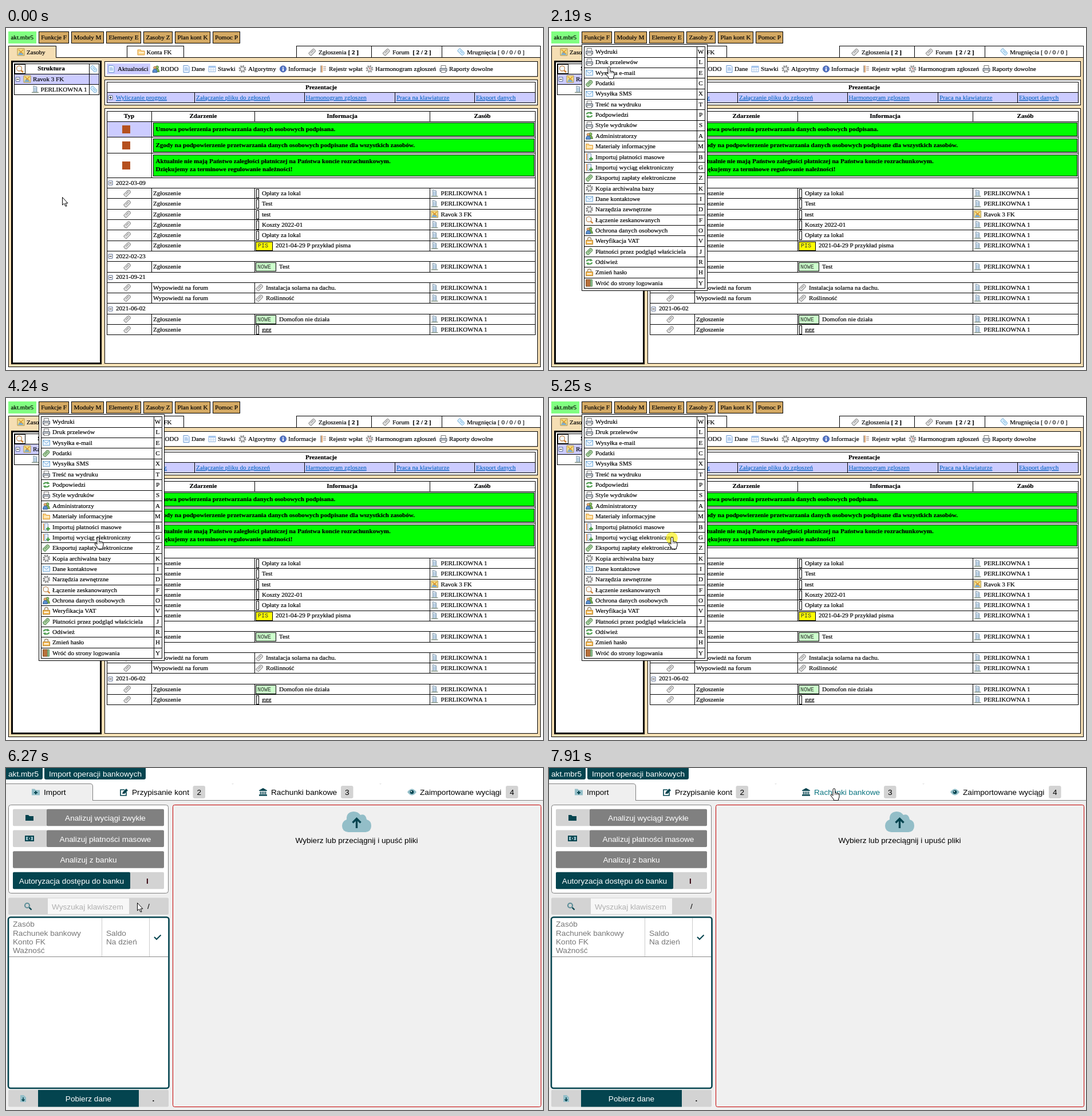
Write an HTML page that moves like this. It is 938 by 597 pixels and loops after 8000 ms.

```html
<!DOCTYPE html>
<html lang="pl">
<head>
<meta charset="utf-8">
<title>Import</title>
<style>
html, body { margin: 0; width: 100%; height: 100%; overflow: hidden; background: #fff; }
svg { display: block; width: 938px; height: 597px; }
text { white-space: pre; }
.serif { font: 11.1px "Liberation Serif", "Times New Roman", serif; stroke: currentColor; stroke-width: .2px; }
.sans { font: 13.63px "Liberation Sans", Arial, sans-serif; }
.mono { font: 10px "Liberation Mono", "Courier New", monospace; fill: #333; }
.b { font-weight: bold; }
.link { color: #0563c1; fill: #0563c1; text-decoration: underline; stroke-width: .1px; }
</style>
</head>
<body>
<svg id="stage" viewBox="0 0 938 597" xmlns="http://www.w3.org/2000/svg"></svg>
<script>
const LILAC = '#ccccff', WHEAT = '#f5deb3', TAN = '#d4a963', LIME = '#00ff00';
const TEAL = '#04444f', PALE = '#93bec8', SILVER = '#d3d3d3', GREY = '#808080', PAGE = '#efefef';
const SITE = 'akt.mbr5', FIRM = 'Ravok 3 FK', HOUSE = 'PERLIKOWNA 1';

// Drawing helpers
const fillBox = (x1, y1, x2, y2, fill, r = 0) =>
  `<rect x="${x1}" y="${y1}" width="${x2 - x1}" height="${y2 - y1}" rx="${r}" fill="${fill}"/>`;
const box = (x1, y1, x2, y2, fill = '#fff', stroke = '#000', w = 1, r = 0) =>
  `<rect x="${x1 + .5}" y="${y1 + .5}" width="${x2 - x1}" height="${y2 - y1}" rx="${r}" fill="${fill}" stroke="${stroke}" stroke-width="${w}"/>`;
const line = (x1, y1, x2, y2, stroke = '#000') =>
  `<path d="M${x1} ${y1}L${x2} ${y2}" stroke="${stroke}"/>`;
const hLine = (x1, x2, y, c) => line(x1, Math.round(y) + .5, x2 + 1, Math.round(y) + .5, c);
const vLine = (x, y1, y2, c) => line(x + .5, y1, x + .5, y2, c);
const label = (x, y, s, cls = 'serif', extra = '') =>
  `<text x="${x}" y="${y}" class="${cls}" ${extra}>${s}</text>`;
const serif = (x, cy, s, cls = '', mid = false) =>
  label(x, Math.round(cy + 3.6), s, 'serif ' + cls, mid ? 'text-anchor="middle"' : '');
const sans = (x, cy, s, fill = '#000', mid = false, extra = '') =>
  label(x, cy + 4.8, s, 'sans', `fill="${fill}" ${mid ? 'text-anchor="middle"' : ''} ${extra}`);
const path = (d, fill, stroke = 'none', w = 1) =>
  `<path d="${d}" fill="${fill}" stroke="${stroke}" stroke-width="${w}"/>`;
const dot = (x, y, r, fill, stroke = 'none', w = 1) =>
  `<circle cx="${x}" cy="${y}" r="${r}" fill="${fill}" stroke="${stroke}" stroke-width="${w}"/>`;

// Small icons, centred on 0,0
const gear = c => dot(0, 0, 5, 'none', c, 3).replace('/>', ' stroke-dasharray="2.3 1.6"/>') + dot(0, 0, 3.6, '#ececec', c, 1.2);
const slip = (fill, edge) =>
  `<g transform="rotate(-45)">${path('M-6-3H4Q6-3 6 0T4 3H-6Q-7 0-6-3Z', fill, edge)}${path('M-3-.5H3.5', 'none', edge)}</g>`;
const ICONS = {
  clip: slip('#e2e2e2', '#8b8b8b'),
  tag: `<g transform="rotate(90)">${slip('#d9efff', '#86b8dc')}</g>`,
  money: slip('#a9cf9f', '#5d8a58'),
  map: path('M-6-6H6V6H-6Z', '#f8e08a', '#a9924e') + path('M-5 5L-2-1L2 2L5 5Z', '#79aed6') + path('M-4-4L4 3M4-4L-2 2', 'none', '#d9962f', 1.5),
  house: path('M-3-6L3-4V5H-3Z', '#e3edf5', '#7f95a8') + path('M-1-3V4M1.5-3V4', 'none', '#7fa6c9') + path('M-6 5.5H6', 'none', '#8a9a8a', 1.5),
  folder: path('M-6-4H-1L0-2H6V5H-6Z', '#fbd58a', '#dd9a3c') + path('M-4 1H5', 'none', '#fff3d6', 2),
  printer: path('M-4-6H4V-1H-4Z', '#fff', '#777') + path('M-6-1H6V4H-6Z', '#c4ccd6', '#59616b') + path('M-4 2H4V6H-4Z', '#fff', '#777'),
  mail: path('M-6-4.500H6V4.500H-6Z', '#e9f4ff', '#6ea6d6') + path('M-6-4L0 1L6-4', 'none', '#6ea6d6'),
  sheet: path('M-5-6H3L5-4V6H-5Z', '#eaf3ff', '#6f9bd2') + path('M-3-2H2M-3 0H3M-3 2H3', 'none', '#86aede'),
  grid: path('M-6-5H6V5H-6Z', '#fff', '#8bb0de') + path('M-6-3.500H6', 'none', '#a8c8ef', 3) + path('M-2-2V5M2-2V5M-6 1.500H6', 'none', '#b9cfe8'),
  gear: gear('#8d8d8d'),
  clock: gear('#999') + path('M0-2V0H2', 'none', '#b33'),
  people: dot(2, -3, 2.5, '#8cc067', '#547e3c') + path('M-1 5Q-1-1 2-1T6 5Z', '#7ab04f', '#547e3c') + dot(-2, -2, 2.3, '#e7b27a', '#a46a35') + path('M-6 6Q-6 0-2 0T2 6Z', '#5a8fd0', '#365f96'),
  info: dot(0, 0, 5.5, '#5878c8', '#3d57a0') + path('M0-3.500V-2M0-1V3.500', 'none', '#fff', 2),
  list: path('M-5-6V6', 'none', '#555') + path('M-3-6V6', 'none', '#e08a3a', 1.5) + path('M-1-4H4M-1-1H4M-1 2H4', 'none', '#b9a9a0', 1.5),
  plus: path('M-5-6V6', 'none', '#e08a3a', 1.5) + path('M-3-6H3V6H-3Z', '#e6eef8', '#7f95b5') + path('M3 0V7M-.5 3.500H6.500', 'none', '#3f9a3f', 2.2),
  lock: path('M-3-1V-3Q-3-6 0-6T3-3V-1', 'none', '#a09070', 1.5) + path('M-6-1H6V6H-6Z', '#f5bd5c', '#b5812a') + path('M-4 2.500H4', 'none', '#fff', 1.8),
  turn: path('M-5-1Q-3-5 3-3M5 1Q3 5-3 3', 'none', '#4f9d4f', 2) + path('M2-6L6-2L1-1ZM-2 6L-6 2L-1 1Z', '#4f9d4f'),
  lens: path('M2 2L6 6', 'none', '#d0863a', 2.5) + dot(-1, -1, 4.5, '#f4f9ff', '#c48b55', 1.3),
  door: path('M-6-6H2V6H-6Z', '#b8713c', '#7a4a24') + path('M2-6H5V6H2Z', '#8fc08f', '#5b8a5b'),
  minus: path('M-3.500-3.500H3.500V3.500H-3.500Z', '#fff', '#52658a') + path('M-2 0H2', 'none', '#000'),
  open: path('M-3.500-3.500H3.500V3.500H-3.500Z', '#fff', '#52658a') + path('M-2 0H2M0-2V2', 'none', '#000'),
  dir: path('M-7-5H-2L0-3H7V5H-7Z', TEAL),
  dirPlus: path('M-7-5.500H-2L0-3.500H7V5.500H-7Z', PALE) + path('M0-2V4M-3 1H3', 'none', TEAL, 2),
  edit: path('M1-4H-6V6H4V0', 'none', TEAL, 1.6) + path('M-3 3L-2 0L4-6L7-3L1 3Z', TEAL),
  bank: path('M-7-3L0-7L7-3V-2H-7Z', TEAL) + path('M-4.500-1V4M-1.500-1V4M1.500-1V4M4.500-1V4', 'none', TEAL, 1.6) + path('M-7 5.500H7', 'none', TEAL, 2.4),
  eye: path('M-8 0Q0-11 8 0Q0 11-8 0Z', PALE) + dot(0, 0, 3.3, TEAL) + dot(-1, -1, 1.1, '#fff'),
  cash: path('M-8-5H8V5H-8Z', TEAL) + path('M-6-3H6V3H-6Z', PALE) + dot(0, 0, 3.2, TEAL) + path('M0-1.500V1.500', 'none', '#fff'),
  find: path('M2 2L6 6', 'none', TEAL, 2.4) + dot(-1.5, -1.5, 4, 'none', '#5f8f99', 2.2),
  file: path('M-5-6H1L5-2V6H-5Z', PALE) + path('M0-2V4M-2.500 1.500L0 4L2.500 1.500', 'none', TEAL, 1.6)
};
const icon = (name, x, y) => `<g transform="translate(${x} ${y})">${ICONS[name]}</g>`;

function topBar() {
  const items = [['Funkcje F', 57, 109], ['Moduły M', 114, 170], ['Elementy E', 175, 235],
    ['Zasoby Z', 240, 290], ['Plan kont K', 295, 356], ['Pomoc P', 361, 408]];
  return fillBox(4, 6, 53, 27, '#80ff80') + serif(28.3, 16.5, SITE, '', true) +
    items.map(([s, a, b]) => box(a, 6, b, 26, TAN) + serif((a + b) / 2 + .5, 16.5, s, '', true)).join('');
}

function tree() {
  return box(10, 58, 165, 585, '#fff', '#000', 3) + box(14, 62, 162, 116) +
    fillBox(15, 81, 162, 98, LILAC) + hLine(14, 162, 80) + hLine(14, 162, 98) +
    vLine(145, 62, 116) + box(15, 63, 33, 79) + icon('lens', 24, 71.5) +
    serif(79, 70.5, 'Struktura', 'b', true) + icon('tag', 153.5, 71.5) +
    icon('minus', 20.5, 89.5) + icon('map', 37, 89) + serif(47, 89.3, FIRM) +
    icon('house', 51, 107) + serif(60.5, 107.5, HOUSE) + icon('tag', 153.5, 107.5);
}

function toolbar() {
  const items = [['sheet', 184, 195, 'Aktualności'], ['people', 262, 270, 'RODO'], ['sheet', 315, 324, 'Dane'],
    ['grid', 360, 370, 'Stawki'], ['gear', 413, 423, 'Algorytmy'], ['info', 484, 493, 'Informacje'],
    ['list', 555, 564, 'Rejestr wpłat'], ['clock', 635, 645, 'Harmonogram zgłoszeń'], ['printer', 764, 774, 'Raporty dowolne']];
  return box(172, 58, 928, 84) + fillBox(176, 62, 252, 81, LILAC) +
    items.map(([i, x, tx, s]) => icon(i, x, 71.5) + serif(tx, 71.5, s)).join('');
}

function links() {
  const items = [['Wyliczanie prognoz', 192, 176], ['Załączanie pliku do zgłoszeń', 332, 329],
    ['Harmonogram zgloszen', 523.5, 521], ['Praca na klawiaturze', 682, 679], ['Eksport danych', 821, 818]];
  return box(172, 90, 928, 134) + box(176, 94, 924, 130) + fillBox(177, 113, 924, 130, LILAC) +
    hLine(176, 924, 112) + serif(550.5, 103, 'Prezentacje', 'b', true) + icon('open', 182.5, 121.5) +
    items.map(([s, x, v]) => vLine(v, 112, 130) + serif(x, 121, s, 'link')).join('');
}

function banner(y1, y2, lines) {
  const mid = (y1 + y2) / 2;
  return box(257, y1 + 2, 922, y2 - 3, LIME, '#000', 1) + fillBox(203, mid - 7, 217, mid + 7, '#b5501e') +
    lines.map((s, i) => serif(261.5, mid - .2 + (i - (lines.length - 1) / 2) * 14, s, 'b')).join('');
}

function news() {
  const Z = 'Zgłoszenie', W = 'Wypowiedź na forum';
  const rows = ['2022-03-09', [Z, '', 'Opłaty za lokal'], [Z, '', 'Test'], [Z, '', 'test', 1], [Z, '', 'Koszty 2022-01'],
    [Z, '', 'Opłaty za lokal'], [Z, 'PIS', '2021-04-29 P przykład pisma'], '2022-02-23', [Z, 'NOWE', 'Test'],
    '2021-09-21', [W, 'clip', 'Instalacja solarna na dachu.'], [W, 'clip', 'Roślinność'],
    '2021-06-02', [Z, 'NOWE', 'Domofon nie działa'], [Z, '', 'ggg']];
  let s = box(172, 140, 928, 585) + box(176, 145, 924, 535) + fillBox(177, 164, 254, 190, LILAC);
  [['Typ', 215], ['Zdarzenie', 344.5], ['Informacja', 587], ['Zasób', 832]].forEach(([t, x]) => s += serif(x, 153.8, t, 'b', true));
  [163, 190, 218].forEach(y => s += hLine(176, 924, y));
  s += vLine(254, 145, 261) + vLine(434, 145, 163) + vLine(740, 145, 163);
  s += banner(163, 191, ['Umowa powierzenia przetwarzania danych osobowych podpisana.']);
  s += banner(191, 219, ['Zgody na podpowierzenie przetwarzania danych osobowych podpisane dla wszystkich zasobów.']);
  s += banner(219, 261, ['Aktualnie nie mają Państwo zaległości płatniczej na Państwa koncie rozrachunkowym.',
    'Dziękujemy za terminowe regulowanie należności!']);
  rows.forEach((r, i) => {
    const y = 270 + 18.3 * i, top = Math.round(y - 9.2);
    s += hLine(176, 924, top);
    if (typeof r === 'string') {
      s += icon('minus', 182.5, Math.round(y) + .5) + serif(192, y, r);
      return;
    }
    const [kind, badge, text, firm] = r;
    [254, 434, 740].forEach(x => s += vLine(x, top, top + 19));
    s += icon('clip', 212, y) + serif(257, y, kind);
    let x = 447;
    if (badge === 'clip') { s += icon('clip', 443, y); x = 454; }
    else if (badge) {
      const pis = badge === 'PIS', end = pis ? 465 : 471;
      s += box(436, top + 2, end, top + 17, pis ? '#ffff00' : '#ccffcc') + label(pis ? 440 : 439, y + 3.6, badge, 'mono');
      x = end + 6;
    } else s += box(437, top + 2, 441, top + 17);
    s += serif(x, y, text) + icon(firm ? 'map' : 'house', 748.5, y) + serif(759.5, y, firm ? FIRM : HOUSE);
  });
  return s;
}

function desk() {
  const bold = s => `<tspan font-weight="bold">${s}</tspan>`;
  return fillBox(0, 0, 938, 597, '#fff') + topBar() + box(4, 51, 933, 591, WHEAT) +
    box(4, 31, 87, 51, WHEAT) + fillBox(5, 50, 87, 53, WHEAT) + icon('map', 26, 42) + serif(36, 42, 'Zasoby') +
    box(211, 31, 310, 51) + icon('folder', 236, 42) + serif(245.5, 42, 'Konta FK') +
    box(507, 31, 638, 51) + icon('clip', 535, 42) + serif(546, 42, 'Zgłoszenia ' + bold('[ 2 ]')) +
    box(638, 31, 761, 51) + icon('clip', 664.5, 42) + serif(675, 42, 'Forum  ' + bold('[ 2 / 2 ]')) +
    box(761, 31, 933, 51) + icon('tag', 795, 42) + serif(805, 42, 'Mrugnięcia [ 0 / 0 / 0 ]') +
    tree() + toolbar() + links() + news();
}

function menu() {
  const items = ['printer|Wydruki|W', 'printer|Druk przelewów|L', 'mail|Wysyłka e-mail|E', 'money|Podatki|C',
    'mail|Wysyłka SMS|X', 'printer|Treść na wydruku|T', 'turn|Podpowiedzi|P', 'printer|Style wydruków|S',
    'people|Administratorzy|A', 'folder|Materiały informacyjne|M', 'plus|Importuj płatności masowe|B',
    'plus|Importuj wyciąg elektroniczny|G', 'money|Eksportuj zapłaty elektroniczne|Z', 'gear|Kopia archiwalna bazy|K',
    'mail|Dane kontaktowe|I', 'gear|Narzędzia zewnętrzne|D', 'lens|Łączenie zeskanowanych|F',
    'people|Ochrona danych osobowych|O', 'lock|Weryfikacja VAT|V', 'money|Płatności przez podgląd właściciela|J',
    'turn|Odśwież|R', 'lock|Zmień hasło|H', 'door|Wróć do strony logowania|Y'];
  return box(57, 28, 276, 458) + box(61, 32, 272, 454) + vLine(258, 32, 454) + items.map((row, i) => {
    const [ic, s, key] = row.split('|'), y = 41.5 + 18.34 * i;
    return (i ? hLine(61, 272, y - 9.2) : '') + icon(ic, 70.5, y) + serif(81, y, s) + serif(265, y, key, '', true);
  }).join('');
}

function tabs(open) {
  const names = ['Import', 'Przypisanie kont', 'Rachunki bankowe', 'Zaimportowane wyciągi'];
  const icons = ['dirPlus', 'edit', 'bank', 'eye'];
  const xs = open ? [66, 220, 463, 723] : [62, 237, 473.5, 727];
  const badges = open ? [0, 326.5, 585, 873] : [107, 343.5, 595.5, 876.5];
  const seams = open ? [396, 654] : [172, 409, 661];
  let s = fillBox(0, 0, 938, 597, PAGE) + fillBox(0, 0, 938, 56, '#fff') + hLine(0, 938, 56, GREY);
  s += path('M0-3H64V17Q64 20 61 20H0Z', TEAL) + sans(4, 10, SITE, '#fff');
  s += fillBox(67, -4, 244, 20, TEAL, 3) + sans(75, 10, 'Import operacji bankowych', '#fff');
  s += seams.map(x => path(`M${x - 3} 27H${x + 3}Q${x} 27 ${x} 30Q${x} 27 ${x - 3} 27Z`, '#ddd')).join('');
  if (open) s += path('M-1 27.500H147Q151.500 27.500 151.500 32V57.500H-1Z', PAGE) + path('M-1 27.500H147Q151.500 27.500 151.500 32V57', 'none', GREY);
  names.forEach((n, i) => {
    s += icon(icons[i], xs[i] - 14, 42) + sans(xs[i], 42, n, '#000', false, open && i === 2 ? 'id="hot"' : '');
    if (badges[i]) s += fillBox(badges[i], 31, badges[i] + 21.5, 53, SILVER, 3) + sans(badges[i] + 10.7, 42, i + 1, '#000', true);
  });
  return s;
}

function importPage() {
  const soft = '#777';
  const button = (x1, y, x2, s, fill = GREY) => fillBox(x1, y, x2, y + 29.5, fill, 2) + sans((x1 + x2) / 2, y + 15.2, s, '#fff', true);
  const pad = (x1, y, x2) => fillBox(x1, y, x2, y + 29.5, SILVER, 2);
  return tabs(true) + box(4, 64, 283, 218, '#fff', GREY, 1, 4) +
    pad(12, 71.7, 73) + icon('dir', 41, 87) + button(71, 71.7, 276, 'Analizuj wyciągi zwykłe') +
    pad(12, 108.5, 73) + icon('cash', 41, 123) + button(71, 108.5, 276, 'Analizuj płatności masowe') +
    button(12, 145.2, 276, 'Analizuj z banku') +
    pad(215, 181.8, 276) + button(12, 181.8, 217, 'Autoryzacja dostępu do banku', TEAL) +
    label(247, 201.5, 'I', 'sans b', 'text-anchor="middle" fill="#35000d"') +
    pad(4, 226.5, 284) + fillBox(73, 227.5, 215, 255, '#f7f7f7') + icon('find', 38.5, 241.5) +
    sans(80, 241.7, 'Wyszukaj klawiszem', '#b0b0b0') + sans(249, 241, '/', '#000', true) +
    box(3.5, 260, 284, 558.5, '#fff', TEAL, 2.6, 4) +
    ['Zasób', 'Rachunek bankowy', 'Konto FK', 'Ważność'].map((s, i) => sans(12, 272.3 + 15.4 * i, s, soft)).join('') +
    sans(175, 287.7, 'Saldo', soft) + sans(175, 303.1, 'Na dzień', soft) +
    vLine(167, 262, 329, '#ccc') + vLine(250, 262, 329, '#ccc') + hLine(5, 282, 329, '#888') +
    path('M259 295L263 299L270.500 291.500', 'none', TEAL, 2) +
    pad(4, 562, 284) + icon('file', 30, 577) + fillBox(56, 562, 232, 591.5, TEAL) + sans(144, 577, 'Pobierz dane', '#fff', true) +
    label(257.5, 581.5, '.', 'sans b', 'text-anchor="middle"') +
    box(291, 64, 934, 591, '#f0f0f0', '#c40000', 1, 3) +
    path('M598 112Q587 111 587 101Q587 93 595 90Q594 77 607 76Q615 76 619 82Q628 79 630 90Q638 92 638 101Q638 111 628 112Z', PALE) +
    path('M612.500 105V89M605.500 95.500L612.500 88.500L619.500 95.500', 'none', TEAL, 3.4) +
    sans(612.5, 126.5, 'Wybierz lub przeciągnij i upuść pliki', '#000', true);
}

const pointers = {
  arrow: path('M.5 .5V14L3.600 11.200L5.800 16H8L6 10.800H10Z', '#fff', '#000'),
  hand: path('M-2 1.500Q-2 0 0 0T1.800 1.500V7.500Q3.500 6.500 4.500 8Q6 7.200 7 8.700Q9 8 9 10.500V14Q9 16 7.500 18V20.500H-.8V18.500Q-3 16-5.800 12Q-6.400 10-4.200 10.300L-2 12.300Z', '#fff', '#000') +
    path('M1.800 7.500V11M4.500 8V11M7 9V11', 'none', '#000', .8),
  beam: path('M-3-6.500H-1L0-5.500L1-6.500H3M0-5.500V5.500M-3 6.500H-1L0 5.500L1 6.500H3', 'none', '#111', 1.1)
};

const group = (id, content) => `<g id="${id}">${content}</g>`;
const stage = document.getElementById('stage');
stage.innerHTML = group('desk', desk()) + group('menu', menu()) + group('empty', tabs(false)) + group('page', importPage()) +
  `<circle id="glow" r="10.5" fill="#fff000" opacity=".62"/>` +
  group('pointer', Object.entries(pointers).map(([k, v]) => group(k, v)).join(''));
const el = id => document.getElementById(id);
const show = (id, on) => { el(id).style.display = on ? '' : 'none'; };

// Pointer route: time, x, y
const ROUTE = [[0, 98, 295], [230, 98, 295], [1090, 96, 17], [1170, 96, 16], [1950, 96, 16], [2820, 137, 249],
  [3210, 129, 245], [3530, 106, 243], [3610, 106, 243], [4470, 176, 243], [5100, 215, 243], [5400, 215, 243],
  [5490, 216, 244], [6190, 216, 244], [6270, 229, 235], [7040, 485, 37], [7360, 545, 33], [7440, 545, 32],
  [7910, 498, 36], [8000, 498, 36]];

function pointerAt(t) {
  const i = Math.max(1, ROUTE.findIndex(p => p[0] > t));
  const [t0, x0, y0] = ROUTE[i - 1], [t1, x1, y1] = ROUTE[i];
  const u = (t - t0) / (t1 - t0), e = .6 * u * u * (3 - 2 * u) + .4 * u;
  return [x0 + (x1 - x0) * e, y0 + (y1 - y0) * e];
}

function draw(t) {
  const [x, y] = pointerAt(t), inDesk = t < 5490;
  const onTab = t >= 6190 && y < 57;
  const kind = inDesk ? (t >= 1950 || y < 27 ? 'hand' : 'arrow') : t < 6190 ? 'beam' : onTab ? 'hand' : 'arrow';
  show('desk', inDesk);
  show('menu', inDesk && t >= 1570);
  show('empty', t >= 5490 && t < 5650);
  show('page', t >= 5650);
  show('glow', (t >= 1490 && t < 1570) || (t >= 5250 && t < 5330));
  for (const k in pointers) show(k, k === kind);
  el('hot').setAttribute('fill', onTab ? '#0b7580' : '#000');
  el('glow').setAttribute('transform', `translate(${x - .5} ${y + 1.5})`);
  el('pointer').setAttribute('transform', `translate(${Math.round(x)} ${Math.round(y)})`);
}

const start = performance.now();
function tick(now) {
  draw(Math.max(0, now - start) % 8000);
  requestAnimationFrame(tick);
}
draw(0);
requestAnimationFrame(tick);
</script>
</body>
</html>
```
